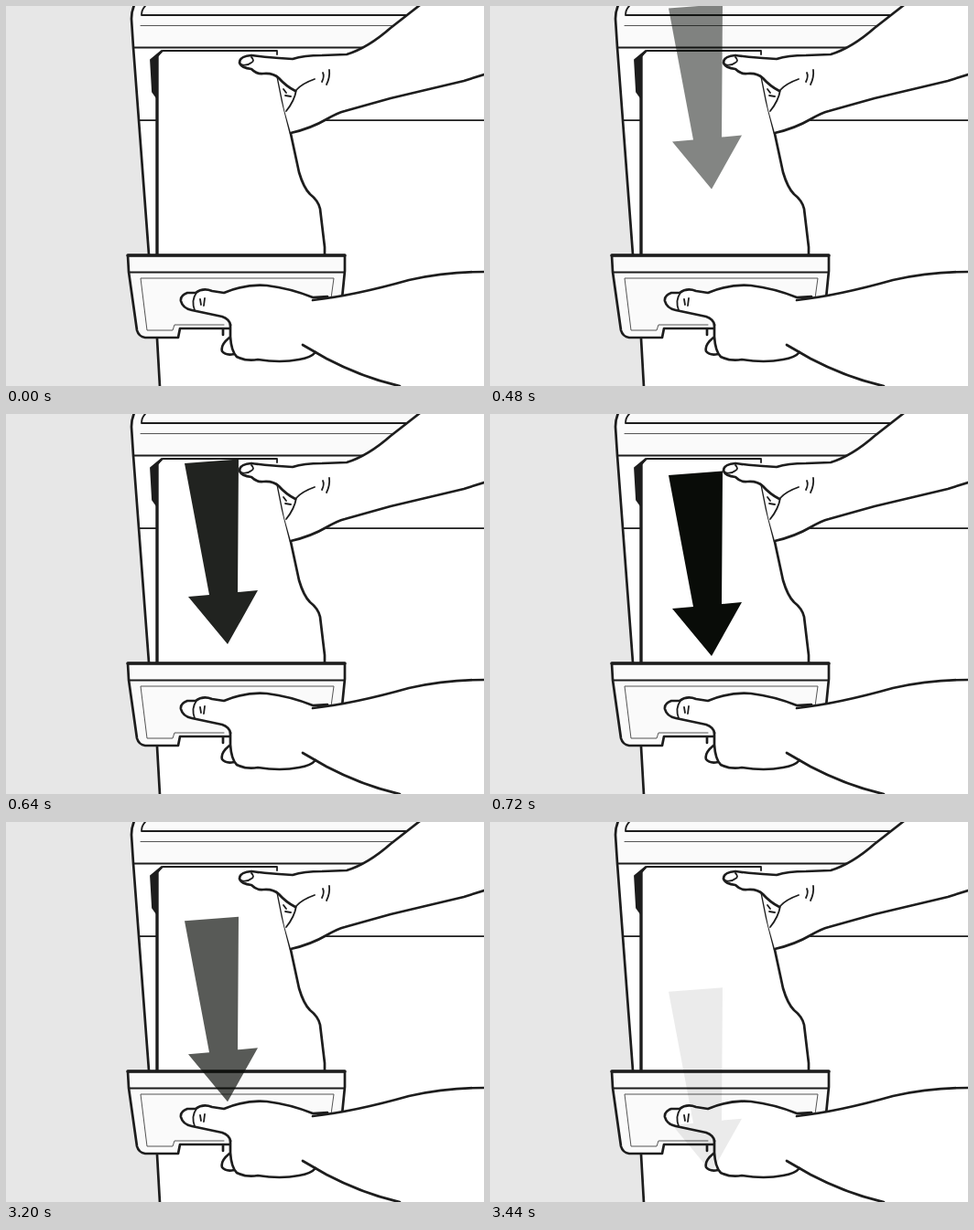
Recreate the animation shown at these times as an HTML page. Size 522 px wide and 416 px high, loop 3.84 s.

```html
<!DOCTYPE html>
<html lang="en">
<head>
<meta charset="utf-8">
<title>Pulling out a drawer</title>
<style>
html, body { margin: 0; width: 100%; height: 100%; overflow: hidden; background: #e7e7e7; }
svg { display: block; width: 522px; height: 416px; }
.ink { fill: none; stroke: #1d1d1d; stroke-width: 2.7; stroke-linejoin: round; stroke-linecap: round; }
.ink .fill { fill: #fff; }
.ink .skin { fill: #fff; stroke: none; }
.ink .bold { stroke-width: 3.4; }
.ink .mid { stroke-width: 1.8; }
.ink .thin { stroke-width: 1; stroke: #555; }
</style>
</head>
<body>
<svg viewBox="0 0 522 416">
  <g class="ink">
    <!-- cabinet -->
    <path class="skin" d="M140 0Q137 6 137 14L139 45 156 272 164 364 168 416H522V0Z"/>
    <path class="skin" style="fill:#fafafa" d="M140 0Q137 6 137 14L139 45H522V0Z"/>
    <path d="M140-1Q137 6 137 14L139 45 145 125 156 272M165 364L168 417"/>
    <path class="mid" d="M152 0Q148 4 148 10H440M139 45.5H400M145 125.200H164M350 125.200H522"/>
    <path class="thin" d="M147 21.500H425"/>

    <!-- drawer body -->
    <path class="skin" d="M165 272V55L171 49H296L298 82 311 140 320 182Q325 199 332 206 341 213 343 222L348 265V272Z"/>
    <path class="mid" style="fill:#1d1d1d" d="M158 59L170 49 165 56V101L160 94Z"/>
    <path class="bold" d="M165 56V272"/>
    <path class="mid" d="M165 55L171 49H296V53"/>
    <path d="M297 79L302 104 311 140 320 182Q325 199 332 206 341 213 343 222L348 264V272"/>

    <!-- drawer front -->
    <path class="fill" style="fill:#fafafa" d="M133 273H370V290L366 330 340 353H190L188 363H152Q145 362 143 355L134 291Z"/>
    <path class="bold" d="M133 273H370"/>
    <path class="mid" d="M135 291.500H370"/>
    <path class="thin" d="M355 320L358 298H147L154 355H182L184 349H238"/>

    <!-- upper hand -->
    <path class="skin" d="M268 54Q285 57 300 58 325 54 345 54L372 53Q395 45 420 24L452 0H522V75L500 82 420 101 370 115 350 124Q333 134 311 139L304 114 297 79Q289 74 280 75 274 74 268 69 256 68 255 62 255 55 268 54Z"/>
    <path d="M452-1L420 24Q395 46 372 53L345 54Q325 54 313 58L298 57Q282 56 268 54 255 55 255 62 257 68 268 69 274 75 281 74 292 73 298 79 306 88 316 93M522 75L500 82 420 101 370 115Q362 117 350 124 333 134 311 139"/>
    <path class="mid" d="M257 64Q263 66 268 62 272 60 268 56M337 80Q323 85 317 92 315 104 306 115M303 91L306 95M305 98L311 99M346 73Q348 77 345 83M353 70Q354 78 350 86"/>

    <!-- lower hand -->
    <path class="skin" d="M207 314Q215 308 225 312L238 314Q262 304 285 306 310 309 335 319L351 320Q380 317 440 300 480 291 522 291V416H430Q390 407 350 386L338 379Q333 385 320 387 300 391 275 387 262 389 252 384 240 386 236 377L245 362 244 348 236 341 203 333Q193 331 191 323 190 316 198 313Z"/>
    <path d="M351 318L335 319Q310 309 285 306 262 304 238 314L225 312Q215 308 207 314L198 314Q190 317 191 323 193 331 203 333L236 340Q244 343 245 349M335 322Q380 317 440 300 480 291 522 291M324 371L350 386Q390 407 430 416"/>
    <path d="M237 354L237 360M245 349V362Q246 378 252 384 262 389 275 387 300 391 320 387 333 385 338 379M244 363Q234 371 236 378 240 383 249 381"/>
    <path class="mid" d="M208 314Q202 322 206 333M212 321L213 327M217 320L216 328"/>
  </g>
  <path id="arrow" fill="#090c08" d="M195 67L254 62.500 253 208 275 206 242 265 199 213 222 211Z"/>
</svg>
<script>
const LOOP = 3840, STEP = 80, FADE = 400, TRAVEL = 129;
const FADE_IN = 280, FADE_OUT = 3072, OUT_END = 3440;
const arrow = document.getElementById('arrow');

function draw(now) {
  // The motion advances in steps; the faint last pose holds until the loop ends.
  const t = Math.min(Math.floor(now % LOOP / STEP) * STEP, OUT_END);
  const enter = Math.max(0, Math.min(1, (t - FADE_IN) / FADE));
  const leave = Math.max(0, (t - FADE_OUT) / FADE);
  arrow.setAttribute('opacity', enter - leave);
  arrow.setAttribute('transform', `translate(0 ${(enter - 1 + leave) * TRAVEL})`);
}

const start = performance.now();
function tick() {
  draw(performance.now() - start);
  requestAnimationFrame(tick);
}
tick();
</script>
</body>
</html>
```
